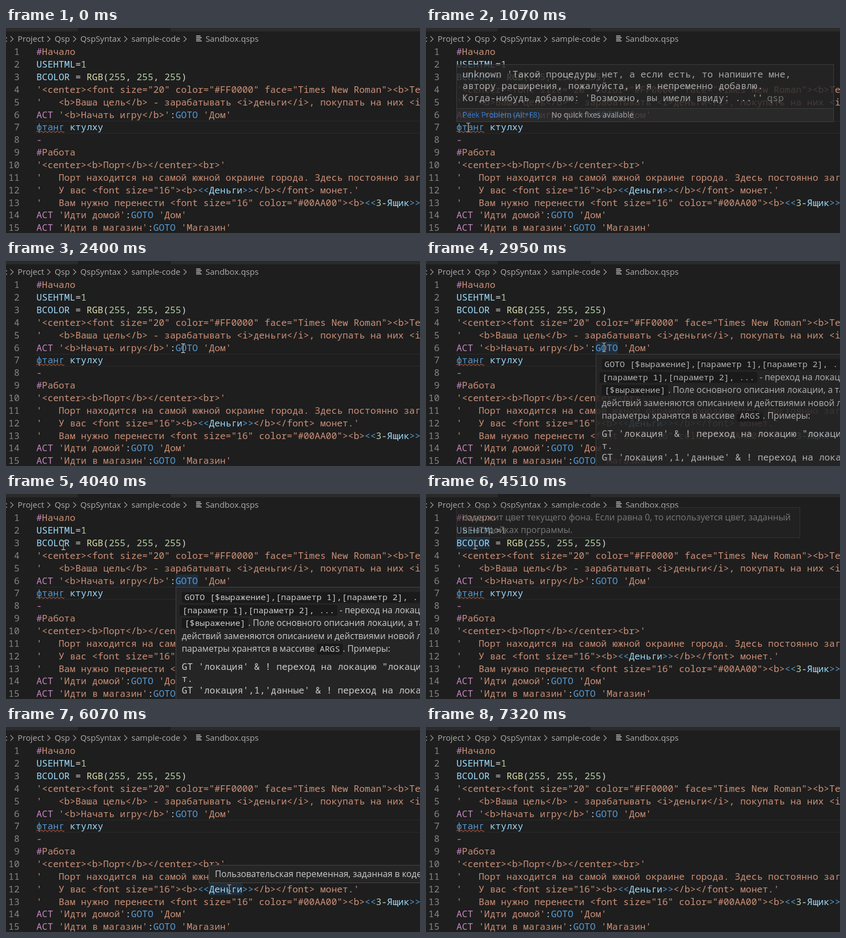
Recreate the animation shown at these times as an HTML page. Size 749 by 373 pixels, loop 7780 ms.

```html
<!DOCTYPE html>
<html lang="ru">
<head>
<meta charset="utf-8">
<title>Hover hints</title>
<style>
  html, body { margin: 0; width: 100%; height: 100%; overflow: hidden; background: #1e1e1e; }
  svg { display: block; width: 749px; height: 373px; overflow: hidden; }
  text { white-space: pre; }
  .mono { font: 500 16.8px "Noto Sans Mono", "DejaVu Sans Mono", monospace; }
  .chip { font: 500 15.3px "Noto Sans Mono", "DejaVu Sans Mono", monospace; }
  .ui { font: 14.8px "Open Sans", "Noto Sans", sans-serif; }
  .small { font: 13.7px "Open Sans", "Noto Sans", sans-serif; }
  .prose { font: 15.8px "Open Sans", "Noto Sans", sans-serif; }
</style>
</head>
<body>
<svg id="stage" viewBox="0 0 749 373"></svg>
<script>
const LOOP = 7780, TICK = 78, LEFT = 55, PITCH = 22.86, CHAR = 10.08;
const COLORS = {
  k: '#c586c0', s: '#ce9178', v: '#9cdcfe', b: '#569cd6',
  n: '#b5cea8', f: '#dcdcaa', t: '#d4d4d4'
};
const stage = document.getElementById('stage');

function add(parent, tag, attrs = {}, content) {
  const node = document.createElementNS('http://www.w3.org/2000/svg', tag);
  for (const key in attrs) node.setAttribute(key, attrs[key]);
  if (content !== undefined) node.textContent = content;
  parent.appendChild(node);
  return node;
}
const rect = (parent, x, y, width, height, fill, more) =>
  add(parent, 'rect', { x, y, width, height, fill, ...more });
const label = (parent, cls, x, y, str, fill = '#cccccc', more) =>
  add(parent, 'text', { class: cls, x, y, fill, ...more }, str);
const path = (parent, d, stroke, width = 1) =>
  add(parent, 'path', { d, stroke, 'stroke-width': width, fill: 'none' });
const rows = (parent, cls, x, y, pitch, list) =>
  list.forEach((str, i) => label(parent, cls, x, y + pitch * i, str));

// Each line is a list of colour key and text, in turn.
const CODE = [
  ['k', '#', 's', 'Начало'],
  ['v', 'USEHTML', 't', '=', 'n', '1'],
  ['v', 'BCOLOR', 't', ' = ', 'f', 'RGB', 't', '(', 'n', '255', 't', ', ', 'n', '255', 't', ', ', 'n', '255', 't', ')'],
  ['s', '\'<center><font size="20" color="#FF0000" face="Times New Roman"><b>Тек'],
  ['s', "'   <b>Ваша цель</b> - зарабатывать <i>деньги</i>, покупать на них <i>"],
  ['k', 'ACT ', 's', "'<b>Начать игру</b>'", 't', ':', 'b', 'GOTO ', 's', "'Дом'"],
  ['b', 'фтанг ', 'v', 'ктулху'],
  ['k', '-'],
  ['k', '#', 's', 'Работа'],
  ['s', "'<center><b>Порт</b></center><br>'"],
  ['s', "'   Порт находится на самой южной окраине города. Здесь постоянно загр"],
  ['s', '\'   У вас <font size="16"><b>', 'b', '<<', 'v', 'Деньги', 'b', '>>', 's', "</b></font> монет.'"],
  ['s', '\'   Вам нужно перенести <font size="16" color="#00AA00"><b>', 'b', '<<', 'n', '3', 't', '-', 'v', 'Ящик', 'b', '>>', 's', '<'],
  ['k', 'ACT ', 's', "'Идти домой'", 't', ':', 'b', 'GOTO ', 's', "'Дом'"],
  ['k', 'ACT ', 's', "'Идти в магазин'", 't', ':', 'b', 'GOTO ', 's', "'Магазин'"]
];

function drawHeader() {
  rect(stage, 0, 0, 749, 373, '#1e1e1e');
  rect(stage, 0, 0, 749, 6, '#2a2a2b');
  rect(stage, 130, 0, 168, 6, '#1e1e1e');
  label(stage, 'ui', -1, 25, ':', '#adadad');
  let x = 21;
  path(stage, 'M8 15l5 5l-5 5', '#a0a0a0', 1.2);
  for (const name of ['Project', 'Qsp', 'QspSyntax', 'sample-code']) {
    x += label(stage, 'ui', x, 25, name, '#adadad').getComputedTextLength();
    path(stage, `M${x + 6} 15l5 5l-5 5`, '#a0a0a0', 1.2);
    x += 19;
  }
  path(stage, 'M344 14.5h8M344 17.5h10M344 20.5h8M344 23.5h10', '#c5c5c5', 1.3);
  label(stage, 'ui', 361, 25, 'Sandbox.qsps', '#adadad');
  path(stage, 'M52 169.5H749M52 191.5H749', '#2a2a2a');
}

const drawWord = (row, col, length) =>
  rect(stage, LEFT + col * CHAR, 32.5 + PITCH * row, length * CHAR, PITCH - 1, '#264f78', { 'fill-opacity': .32 });

function drawCode() {
  CODE.forEach((tokens, row) => {
    const y = 49.2 + PITCH * row;
    label(stage, 'mono', 24.5, y, row + 1, '#858585', { 'text-anchor': 'end' });
    const line = label(stage, 'mono', LEFT, y, '');
    for (let i = 0; i < tokens.length; i += 2)
      add(line, 'tspan', { fill: COLORS[tokens[i]] }, tokens[i + 1]);
  });
  path(stage, 'M55 188.8' + 'q1.8 -2.6 3.6 0t3.6 0'.repeat(7), '#e8704f');
}

function makeTip(x, y, w, h) {
  const tip = add(stage, 'g');
  rect(tip, x + .5, y + .5, w - 1, h - 1, '#252526', { stroke: '#454545' });
  return tip;
}

// Lays prose and `chips` one after another, like inline text.
function flow(tip, x, y, str) {
  str.split('`').forEach((part, i) => {
    if (!part) return;
    const isChip = i % 2, pad = isChip ? 5 : 0;
    const back = isChip && rect(tip, x, y - 15, 0, 20, '#0a0a0a', { 'fill-opacity': .4, rx: 3 });
    const width = label(tip, isChip ? 'chip' : 'prose', x + pad, y, part).getComputedTextLength() + 2 * pad;
    if (back) back.setAttribute('width', width);
    x += width;
  });
}

function problemTip() {
  const tip = makeTip(55, 66, 683, 105);
  rows(tip, 'mono', 66, 89.6, 21.8, [
    "unknown 'Такой процедуры нет, а если есть, то напишите мне,",
    'автору расширения, пожалуйста, и я непременно добавлю.',
    "Когда-нибудь добавлю: 'Возможно, вы имели ввиду: ...''"
  ]);
  label(tip, 'mono', 617, 133.2, 'qsp', '#858585');
  rect(tip, 56, 146, 681, 24, '#2c2c2d');
  path(tip, 'M56 146.5H737', '#454545');
  label(tip, 'small', 66, 163, 'Peek Problem (Alt+F8)', '#3794ff');
  label(tip, 'small', 227, 163, 'No quick fixes available');
  return tip;
}

function gotoTip() {
  const tip = makeTip(307, 169, 460, 220);
  [
    '`GOTO [$выражение],[параметр 1],[параметр 2], ...`',
    '`[параметр 1],[параметр 2], ...` - переход на локацию',
    '`[$выражение]`. Поле основного описания локации, а так',
    'действий заменяются описанием и действиями новой лок',
    'параметры хранятся в массиве `ARGS`. Примеры:'
  ].forEach((str, i) => flow(tip, i === 1 ? 314 : 318, 193.2 + 23.5 * i, str));
  rows(tip, 'mono', 318, 320.3, 21.5, [
    'GT \'локация\' & ! переход на локацию "локация',
    'т.',
    "GT 'локация',1,'данные' & ! переход на локац"
  ]);
  return tip;
}

function colorTip() {
  const tip = makeTip(55, 24, 622, 56);
  rows(tip, 'prose', 66, 48, 22.5, [
    'содержит цвет текущего фона. Если равна 0, то используется цвет, заданный',
    'в настройках программы.'
  ]);
  return tip;
}

function moneyTip() {
  const tip = makeTip(367, 251, 400, 33);
  label(tip, 'prose', 378, 273, 'Пользовательская переменная, заданная в коде игры');
  return tip;
}

drawHeader();
const gotoWord = drawWord(5, 25, 4), colorWord = drawWord(2, 0, 6), moneyWord = drawWord(11, 31, 6);
drawCode();

// A hint fades in from `first` and goes away at `off`.
const hints = [
  { tip: problemTip(), on: 1070, first: .8, off: 2080 },
  { tip: gotoTip(), word: gotoWord, on: 2950, first: .86, off: 4120 },
  { tip: colorTip(), word: colorWord, on: 4510, first: .52, off: 5290 },
  { tip: moneyTip(), word: moneyWord, on: 5920, first: .3, off: 7080 }
];

const cursor = add(stage, 'g');
const BEAM = 'M-3.5 -8H-1.2Q0 -8 0 -6.8Q0 -8 1.2 -8H3.5M0 -7V7M-3.5 8H-1.2Q0 8 0 6.8Q0 8 1.2 8H3.5';
path(cursor, BEAM, '#101010', 2.4);
path(cursor, BEAM, '#dcdcdc', 1.1);

// The pointer glides from point to point, each path bent towards `via`.
const ENTRY = [990, 523];
const glides = [
  { start: 220, steps: 5, via: [150, 105], to: [66, 181] },
  { start: 680, steps: 1, via: [70, 181], to: [76.5, 181] },
  { start: 1920, steps: 8, via: [275, 211], to: [322, 157] },
  { start: 3960, steps: 3, via: [150, 95], to: [89, 92] },
  { start: 5130, steps: 6, via: [300, 200], to: [404, 295] },
  { start: 6920, steps: 6, via: [420, 330], to: [470, 400] }
];
const ticksSince = (t, start) => Math.floor((t - start + 6) / TICK);
const easeOut = p => 1 - (1 - p) ** 2;
const bend = (a, b, c, p) => (1 - p) ** 2 * a + 2 * p * (1 - p) * b + p * p * c;

function pointerAt(t) {
  let pos = ENTRY;
  for (const { start, steps, via, to } of glides) {
    if (t < start) break;
    const p = easeOut(Math.min(1, (ticksSince(t, start) + 1) / steps));
    pos = pos.map((from, axis) => bend(from, via[axis], to[axis], p));
  }
  return pos;
}

function render(t) {
  for (const { tip, word, on, first, off } of hints) {
    const shown = t >= on && t < off;
    tip.setAttribute('opacity', shown ? Math.min(1, first + .5 * ticksSince(t, on)) : 0);
    if (word) word.setAttribute('opacity', shown ? 1 : 0);
  }
  cursor.setAttribute('transform', `translate(${pointerAt(t).join(' ')})`);
}

let start;
function tick(now) {
  if (start === undefined) start = now;
  render((now - start) % LOOP);
  requestAnimationFrame(tick);
}
render(0);
requestAnimationFrame(tick);
</script>
</body>
</html>
```
